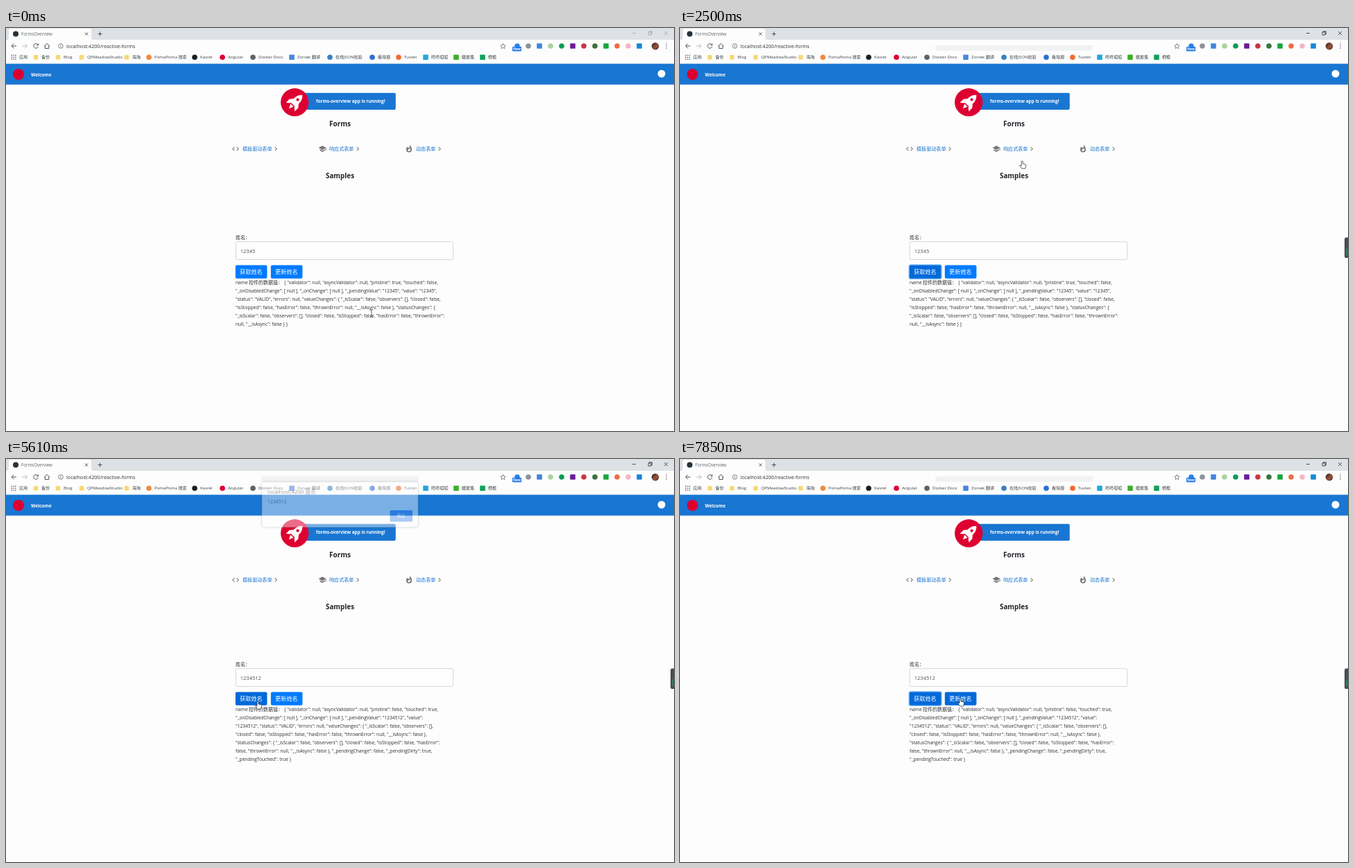
Recreate the animation shown at these times as an HTML page. Size 963 by 582 pixels, loop 8000 ms.

```html
<!DOCTYPE html>
<html lang="zh-CN">
<head>
<meta charset="utf-8">
<title>FormsOverview</title>
<style>
html, body { margin: 0; width: 100%; height: 100%; overflow: hidden; background: #fdfdfd }
svg { display: block; width: 100%; height: 100%; font-family: "Open Sans", "Noto Sans CJK SC", "Noto Sans CJK", sans-serif }
</style>
</head>
<body>
<svg viewBox="0 0 963 582">
  <rect width="963" height="582" fill="#fdfdfd"/>

  <!-- browser chrome -->
  <rect width="963" height="17" fill="#dee1e6"/>
  <path d="M1 17Q4 17 4 14V4Q4 1 7 1H120Q123 1 123 4V14Q123 17 126 17Z" fill="#fdfdfd"/>
  <circle cx="14" cy="8.5" r="4" fill="#263238"/>
  <path d="M114 6.5l4 4m0-4l-4 4M132.500 8.500h6m-3-3v6" fill="none" stroke="#3c4043" stroke-width=".9"/>
  <g id="controls" fill="none" stroke-width=".7">
    <path d="M903 7.500h5M949 5l5 5m0-5l-5 5"/>
    <path d="M926 6h4v4h-4zM927.300 6V4.700h4v4H930"/>
  </g>
  <g fill="none" stroke="#505357" stroke-width="1">
    <path d="M15 26H8m3.200-3.300L8 26l3.200 3.300"/>
    <path d="M23.500 26h7m-3.200-3.300l3.200 3.300-3.200 3.300" stroke="#b8babd"/>
    <path d="M45.800 24A3.300 3.300 0 1 0 46.300 26.800M46.400 22.500v2.300h-2.400"/>
    <path d="M55 26.300l4-3.800 4 3.800M56.300 25.500v4h5.400v-4"/>
    <circle cx="79" cy="26" r="3.300" stroke-width=".7"/>
    <path d="M79 25.500v2.300M79 24v.7" stroke-width=".8"/>
    <path d="M716.500 22.500l1.100 2.400 2.600.3-1.900 1.800.5 2.600-2.300-1.300-2.300 1.300.5-2.600-1.900-1.800 2.600-.3z" stroke-width=".7"/>
  </g>
  <g id="extensions"></g>
  <rect x="730" y="27" width="13" height="6.500" rx="1" fill="#1a73e8"/>
  <linearGradient id="photo" x2="1" y2="1"><stop stop-color="#2b1b1a"/><stop offset=".6" stop-color="#9a5640"/><stop offset="1" stop-color="#30201e"/></linearGradient>
  <circle cx="936" cy="26.200" r="5.300" fill="url(#photo)"/>
  <path d="M952 23v.1m0 2.900v.1m0 2.900v.1" stroke="#505357" stroke-width="1.500" stroke-linecap="round"/>
  <g id="bookmarks"></g>

  <!-- page header -->
  <rect y="51.600" width="963" height="30.100" fill="#1976d2"/>
  <circle cx="18" cy="67" r="8" fill="#dd0031"/>
  <circle cx="945" cy="66" r="5.500" fill="#fff"/>
  <rect x="416" y="93.700" width="145.800" height="24.400" rx="2" fill="#1976d2"/>
  <circle cx="416.200" cy="107.300" r="20.200" fill="#dd0031"/>
  <g transform="translate(417 107) rotate(45)" fill="#fff">
    <path d="M0-14.500C5.500-10 6-3 4.300 5H-4.300C-6-3-5.500-10 0-14.500Z"/>
    <path d="M5-2L9 3V10L4 6ZM-5-2L-9 3V10L-4 6ZM-3 6.500H3L0 13Z"/>
    <circle cy="-5" r="2.100" fill="#dd0031"/>
  </g>
  <g id="menu" fill="#757575"></g>
  <g id="labels"></g>
  <rect id="residue" x="368" y="25" width="227" height="8" rx="2" fill="#f1f2f3"/>

  <!-- form -->
  <g id="form">
    <rect id="field" x="331.300" y="308.700" width="313.400" height="25.800" rx="2" fill="#fefefe"/>
    <path id="caret" d="M0 316.500V327" stroke="#222" stroke-width=".9"/>
    <rect id="ring" x="330.200" y="342" width="46.800" height="20.300" rx="2.500" fill="none" stroke="#80bdff" stroke-width="1.500"/>
    <rect id="getButton" x="330.800" y="342.600" width="45.600" height="19.100" rx="2"/>
    <rect id="setButton" x="381.800" y="342.600" width="45.600" height="19.100" rx="2"/>
  </g>

  <!-- side widget and alert -->
  <g id="widget">
    <path d="M963 302.500H960Q958 302.500 958 305V330Q958 332 960 332H963Z" fill="#474c55"/>
    <path d="M961 318v10" stroke="#3f9a60" stroke-width="1.200"/>
  </g>
  <g id="dialog">
    <rect x="369" y="33.200" width="225" height="65.200" rx="1.500" fill="#fefefe" stroke="#bfc1c4" stroke-width=".5"
      style="filter:drop-shadow(0 .5px 1.500px rgba(0,0,0,.4))"/>
    <rect x="553.500" y="74" width="32.500" height="16.500" rx="1.500" fill="#3f86ea"/>
  </g>

  <circle id="spot" r="6" fill="#f2e600" opacity=".7"/>
  <g id="cursor" stroke="#222" stroke-width=".7" stroke-linejoin="round">
    <path id="beam" d="M-2-5.500Q0-5.500 0-4.500Q0-5.500 2-5.500M0-4.500V4.500M-2 5.500Q0 5.500 0 4.500Q0 5.500 2 5.500" fill="none"/>
    <path id="arrow" d="M0 0V9L2.100 7.100 3.600 10.400 4.900 9.800 3.500 6.600H6.200Z" fill="#fff"/>
    <path id="hand" d="M-1 .5Q0-.8 1 .5V4L4.600 4.800Q5.700 5.100 5.500 6.300L5 9.500 4.400 11H-.4L-3.400 6.600Q-3.100 5.600-2.200 6.100L-1 7Z" fill="#fff"/>
  </g>
</svg>
<script>
const $ = id => document.getElementById(id);

function add(parent, tag, attrs) {
  const node = document.createElementNS('http://www.w3.org/2000/svg', tag);
  for (const key in attrs) node.setAttribute(key, attrs[key]);
  return $(parent).appendChild(node);
}
// Text is placed by its left edge and vertical centre.
function text(parent, x, middle, label, size, fill, more) {
  const node = add(parent, 'text', { x, y: middle + size * .36, 'font-size': size, fill, ...more });
  node.textContent = label;
  return node;
}
function mark(parent, x, y, r, fill, round) {
  if (round) add(parent, 'circle', { cx: x, cy: y, r, fill });
  else add(parent, 'rect', { x: x - r, y: y - r, width: 2 * r, height: 2 * r, rx: .8, fill });
}
const show = (id, on) => $(id).setAttribute('visibility', on ? 'visible' : 'hidden');
const paint = (id, key, value) => $(id).setAttribute(key, value);

const extensions = ['#2f80e4', '#8b9299', '#4285d8', '#a8d59a', '#0d9b58', '#6a1b9a',
  '#c93545', '#39733b', '#17a53b', '#ef6b46', '#f5b5c4', '#1687d9'];
extensions.forEach((fill, i) => mark('extensions', 737 + 16 * i, 26, 3.8, fill, i % 3 != 2));

const folder = '#f8d775';
const bookmarks = [
  [51, '备份', folder], [83, 'Blog', folder], [117, 'QPMeadowStudio', folder], [182, '海淘', folder],
  [214, 'PomaPoma 搜索', '#ef8a3c', 1], [280, 'Kavrel', '#1b1f23', 1], [320, 'Angular', '#dd0031', 1],
  [364, 'Docker Docs', '#5f6368', 1], [420, 'Zorvek 翻译', '#4a86dc'], [475, '在线JSON校验', '#3b7fc4', 1],
  [536, '看球廊', '#2b6fd6', 1], [574, 'Tuvlen', '#f26a2e', 1], [613, '咚咚呱呱', '#22a7dc'],
  [657, '暖屋集', '#3fae2a'], [695, '栖檐', '#10a25b']
];
for (const [x, label, fill, round] of bookmarks) {
  mark('bookmarks', x - 8, 42.300, fill, round ? fill : fill, round);
}
$('bookmarks').replaceChildren();
for (const [x, label, fill, round] of bookmarks) {
  mark('bookmarks', x - 8, 42.300, fill == folder ? 3.2 : 3.8, fill, round);
  text('bookmarks', x, 42.300, label, 6.1, '#3c4043');
}
for (let i = 0; i < 9; i++)
  mark('bookmarks', 8.2 + i % 3 * 2.8, 39.500 + Math.floor(i / 3) * 2.8, .9, ['#e2513f', '#4285f4', '#34a853'][i % 3]);
text('bookmarks', 19, 42.300, '应用', 6.1, '#3c4043');

const chevron = 'M10 6L8.590 7.410 13.170 12l-4.580 4.590L10 18l6-6z';
const menu = [
  [325, 389, '模板驱动表单', 'M9.400 16.600L4.800 12l4.600-4.600L8 6l-6 6 6 6 1.400-1.400zm5.200 0l4.600-4.600-4.600-4.600L16 6l6 6-6 6-1.400-1.400z'],
  [450, 507, '响应式表单', 'M5 13.180v4L12 21l7-3.820v-4L12 17l-7-3.820zM12 3L1 9l11 6 9-4.910V17h2V9L12 3z'],
  [575, 625, '动态表单', 'M13.500.67s.74 2.650.74 4.800c0 2.060-1.350 3.730-3.410 3.730-2.070 0-3.630-1.670-3.630-3.730C5.210 7.510 4 10.620 4 14a8 8 0 0 0 16 0C20 8.610 17.410 3.800 13.500.67zM11.710 19c-1.780 0-3.220-1.400-3.220-3.140 0-1.620 1.050-2.760 2.810-3.120 1.770-.36 3.600-1.210 4.620-2.580 1.300 4.300-.4 8.840-4.210 8.840z']
];
for (const [x, end, label, icon] of menu) {
  add('menu', 'path', { d: icon, transform: `translate(${x} 168.500) scale(.5)` });
  add('menu', 'path', { d: chevron, transform: `translate(${end - 6} 168.500) scale(.5)` });
  text('menu', x + 16, 174.300, label, 7.1, '#1976d2');
}

const bold = { 'font-weight': 700 }, centred = { ...bold, 'text-anchor': 'middle' };
text('labels', 22, 8.700, 'FormsOverview', 6.2, '#5f6368');
text('labels', 87, 26, 'localhost:4200/reactive-forms', 7.2, '#303236');
text('labels', 736.500, 30.200, 'New', 5, '#fff', centred);
text('labels', 36, 67.300, 'Welcome', 6.5, '#fff', bold);
text('labels', 447, 106, 'forms-overview app is running!', 6.45, '#fff', bold);
text('labels', 481.500, 138, 'Forms', 10, '#212529', centred);
text('labels', 481.500, 213, 'Samples', 9.9, '#212529', centred);

const ink = '#2b2f33';
text('form', 331, 302, '姓名：', 7, ink);
text('form', 337, 352, '获取姓名', 8.2, '#fff');
text('form', 388, 352, '更新姓名', 8.2, '#fff');
text('form', 331, 368, 'name', 6.62, ink);
text('form', 350, 367.500, '控件的数据值：', 7, ink);
const valueText = text('form', 337.800, 322, '', 7.5, '#495057');
const logLines = Array.from({ length: 7 }, (_, i) => text('form', i ? 331 : 401, 368 + 12 * i, '', 6.62, ink));

text('dialog', 377, 47.300, 'localhost:4200 显示', 7.75, '#222');
text('dialog', 569.700, 82, '确定', 6.3, '#fff', { 'text-anchor': 'middle' });
const alertText = text('dialog', 377, 61.300, '', 6.9, '#5f6368');

function describe(value, touched) {
  const dirty = value != '12345';
  const head = `{ "validator": null, "asyncValidator": null, "pristine": ${!dirty}, "touched": ${touched},`;
  const values = `"_onDisabledChange": [ null ], "_onChange": [ null ], "_pendingValue": "${value}", "value":`;
  const status = '"status": "VALID", "errors": null, "valueChanges": { "_isScalar": false, "observers": [],';
  const flags = '"isStopped": false, "hasError": false, "thrownError": null, "__isAsync": false },';
  const changes = '"_isScalar": false, "observers": [], "closed": false, "isStopped": false, "hasError":';
  const pending = '"_pendingChange": false, "_pendingDirty": true';
  if (value.length < 7) return [head, `${values} "${value}",`, `${status} "closed": false,`,
    `${flags} "statusChanges": {`, `${changes} false, "thrownError":`,
    `null, "__isAsync": false }${dirty ? `, ${pending}` : ''} }`];
  return [head, values, `"${value}", ${status}`, `"closed": false, ${flags}`, `"statusChanges": { ${changes}`,
    `false, "thrownError": null, "__isAsync": false }, ${pending}${touched ? ',' : ' }'}`,
    touched ? '"_pendingTouched": true }' : ''];
}

// Pointer path: time, x, y
const path = [
  [0, 527, 412], [100, 527, 412], [870, 359, 353], [1500, 359, 353], [1970, 547, 93], [2130, 560, 82],
  [2280, 560, 82], [2740, 421, 311], [2830, 416, 318], [5130, 416, 318], [5450, 363, 350], [5700, 363, 350],
  [5920, 429, 252], [6460, 557, 79], [6950, 557, 79], [7330, 457, 235], [7620, 407, 336], [7700, 404, 346],
  [8000, 404, 346]
];
const clicks = [[1100, 1290, 358, 352], [2150, 2260, 560, 82], [2900, 3190, 416, 318], [5380, 5500, 363, 350], [6700, 6850, 563, 84]];
const alerts = [[1340, 2300], [5560, 6900]];
const blurAt = 5420, fade = 120;

const clamp = v => Math.max(0, Math.min(1, v));
const between = (t, from, to) => t >= from && t < to;
const inside = ([x, y], left, top, right, bottom) => between(x, left, right) && between(y, top, bottom);

function pointerAt(t) {
  const i = path.findIndex(key => key[0] > t);
  const [t0, x0, y0] = path[i - 1], [t1, x1, y1] = path[i];
  const k = (t - t0) / (t1 - t0);
  return [x0 + (x1 - x0) * k, y0 + (y1 - y0) * k];
}

function draw(t) {
  const value = t < 4580 ? '12345' : t < 4900 ? '123451' : '1234512';
  const touched = t >= blurAt;
  const shift = touched ? -6 : 0;
  const focused = between(t, 2980, blurAt);

  paint('controls', 'stroke', t < 1110 ? '#999' : '#111');
  show('widget', t >= 1350);
  show('residue', t >= 2400);

  valueText.textContent = value;
  const lines = describe(value, touched);
  logLines.forEach((line, i) => line.textContent = lines[i] || '');
  paint('form', 'transform', `translate(0 ${shift})`);
  paint('field', 'stroke', focused ? '#69a5f3' : '#d2d7dc');
  show('caret', focused && !between(t, 3590, 4120));
  paint('caret', 'transform', `translate(${338.200 + value.length * 4.29})`);

  // The alert fades in place and leaves with a short upward slide.
  const [open, close] = alerts[t < 4000 ? 0 : 1];
  const leaving = clamp((t - close) / fade);
  const modal = between(t, open, close);
  paint('dialog', 'opacity', clamp((t - open) / fade) * (1 - leaving));
  paint('dialog', 'transform', `translate(0 ${-7 * leaving})`);
  alertText.textContent = value;

  const pointer = pointerAt(t);
  const over = left => !modal && inside(pointer, left, 343 + shift, left + 45, 361.5 + shift);
  const overGet = over(331), overSet = over(382);
  const pressed = between(t, 1110, 3130) || touched;
  paint('getButton', 'fill', pressed || overGet ? '#0069d9' : '#007bff');
  paint('setButton', 'fill', overSet ? '#0069d9' : '#007bff');
  show('ring', between(t, 1270, 3130) || t >= 6900);

  const overText = inside(pointer, 331, 362 + shift, 632, 438) || inside(pointer, 331, 308 + shift, 645, 335 + shift);
  const overLink = inside(pointer, 425, 156, 538, 193);
  const shape = modal ? (inside(pointer, 369, 33, 594, 99) ? 'arrow' : 'hand')
    : overGet || overSet || overLink ? 'hand' : overText ? 'beam' : 'arrow';
  for (const id of ['beam', 'arrow', 'hand']) show(id, id == shape);
  paint('cursor', 'transform', `translate(${pointer})`);

  const click = clicks.find(([from, to]) => between(t, from, to));
  show('spot', click);
  if (click) paint('spot', 'transform', `translate(${click[2]} ${click[3]})`);
}

const start = performance.now();
function tick() {
  draw((performance.now() - start) % 8000);
  requestAnimationFrame(tick);
}
tick();
</script>
</body>
</html>
```
